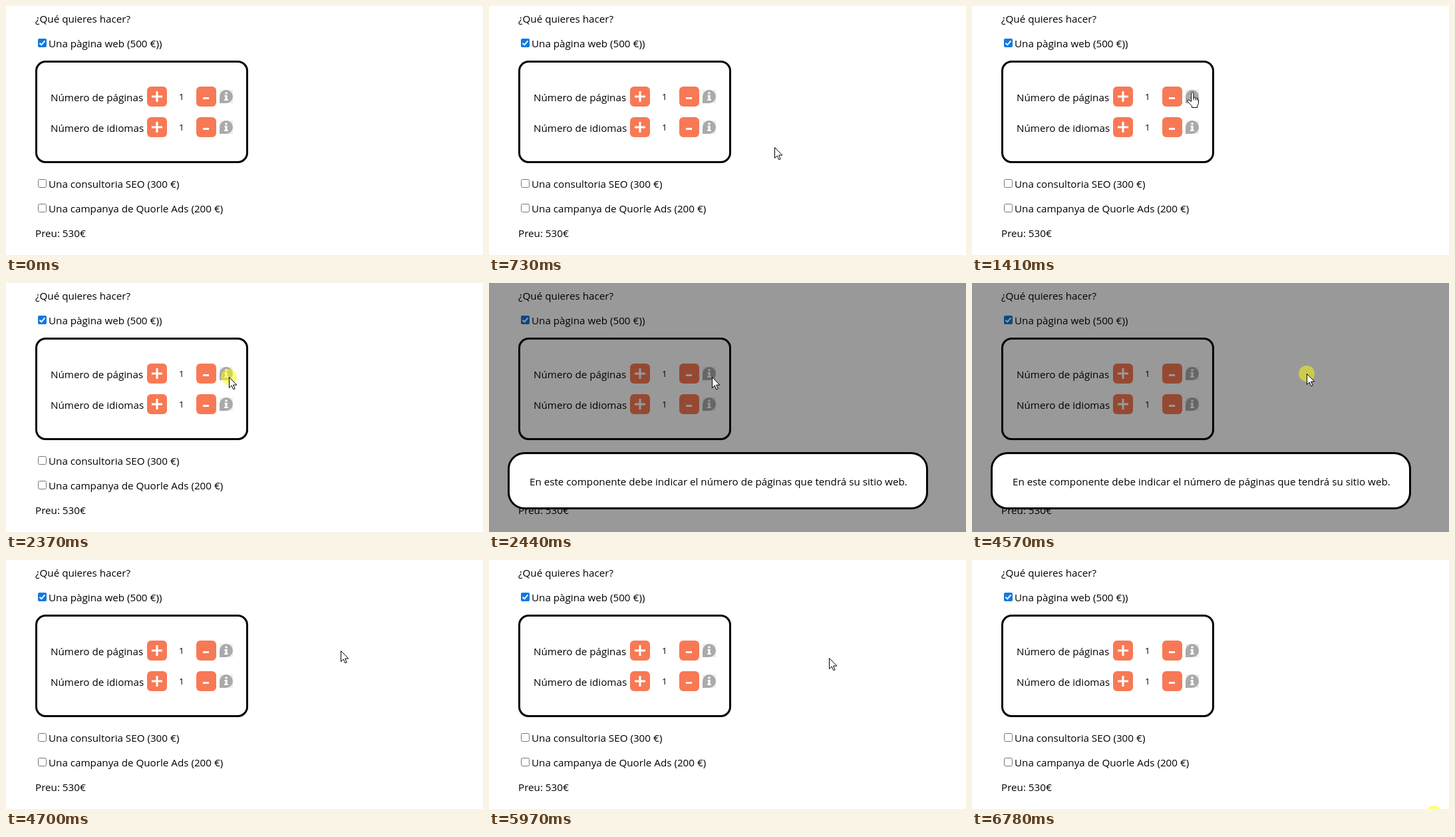
An HTML page with a canvas for the animation above (6850 ms loop, 717 px wide and 374 px high).

```html
<!DOCTYPE html>
<html lang="es">
<head>
<meta charset="utf-8">
<title>Presupuesto</title>
<style>
html, body { margin: 0; width: 100%; height: 100%; overflow: hidden; background: #fff; }
canvas { display: block; }
</style>
</head>
<body>
<canvas id="stage" width="717" height="374"></canvas>
<script>
const LOOP = 6850;
const MODAL_ON = 2440, MODAL_OFF = 4700;
const ctx = document.getElementById('stage').getContext('2d');

const easeOut = u => 1 - (1 - u) ** 2;
const smooth = u => u * u * (3 - 2 * u);
const linear = u => u;

// start time, step length, step count, easing, waypoints of the pointer
const moves = [
  [520, 70, 9, easeOut, [[654, 399], [329, 129]]],
  [1410, 70, 1, linear, [[329, 129], [330, 130]]],
  [1680, 70, 1, linear, [[330, 130], [331, 131]]],
  [1880, 70, 7, smooth, [[331, 131], [335, 141]]],
  [3040, 70, 10, smooth, [[335, 141], [318, 215], [332, 296], [375, 317], [410, 303], [404, 278]]],
  [3740, 72, 6, easeOut, [[404, 278], [440, 210], [503, 136]]],
  [5970, 69, 8, smooth, [[503, 136], [694, 381]]]
];

// press time, release time
const clicks = [[2300, 2440], [4570, 4700], [6780, 6850]];

const arrow = new Path2D('M.5 .5V16.5L4.2 13L6.8 18.8L9.2 17.8L6.6 12.1H11.8Z');
const hand = new Path2D('M6.5 14.5V2.3a1.7 1.7 0 0 1 3.4 0V8.6q1.7-1.3 3 .5q1.5-.9 2.6 .8q1.8-.3 2 1.6V16q0 3-2 5.2V23.5H7.5V21L1.2 14.8q-1.2-2 .6-2.8q1.5-.2 4.7 2.5Z');
const knuckles = new Path2D('M9.9 8.6V12M12.9 9.2V12.5M15.5 10V13');

function along(points, u) {
  const last = points.length - 1;
  const i = Math.min(Math.floor(u * last), last - 1);
  const f = u * last - i;
  const at = n => points[Math.max(0, Math.min(last, n))];
  const [a, b, c, d] = [at(i - 1), at(i), at(i + 1), at(i + 2)];
  return [0, 1].map(k => last === 1
    ? b[k] + (c[k] - b[k]) * f
    : b[k] + f / 2 * (c[k] - a[k]
      + f * (2 * a[k] - 5 * b[k] + 4 * c[k] - d[k]
      + f * (3 * (b[k] - c[k]) + d[k] - a[k]))));
}

function pointer(t) {
  const move = moves.filter(m => m[0] <= t).pop();
  if (!move) return null;
  const [start, step, count, ease, points] = move;
  const k = Math.min(Math.floor((t - start) / step) + 1, count);
  return along(points, ease(k / count)).map(Math.round);
}

function label(s, x, y, size = 15.2) {
  ctx.font = size + 'px "Open Sans", "Noto Sans", sans-serif';
  ctx.fillStyle = '#000';
  ctx.fillText(s, x, y);
}

function box(x, y, w, h, r, fill, stroke, line = 1) {
  ctx.beginPath();
  ctx.roundRect(x, y, w, h, r);
  if (fill) {
    ctx.fillStyle = fill;
    ctx.fill();
  }
  if (stroke) {
    ctx.strokeStyle = stroke;
    ctx.lineWidth = line;
    ctx.stroke();
  }
}

function disc(x, y, r, color) {
  ctx.fillStyle = color;
  ctx.beginPath();
  ctx.arc(x, y, r, 0, Math.PI * 2);
  ctx.fill();
}

function checkbox(y, checked) {
  if (!checked) {
    box(48.5, y + .5, 12, 12, 2, '#fff', '#767676');
    return;
  }
  box(48, y, 13, 13, 2, '#1179df');
  ctx.strokeStyle = '#fff';
  ctx.lineWidth = 2;
  ctx.beginPath();
  ctx.moveTo(50.5, y + 6.7);
  ctx.lineTo(53.3, y + 9.4);
  ctx.lineTo(58.4, y + 3.3);
  ctx.stroke();
}

function infoIcon(x, y) {
  box(x - 10, y - 10, 20, 20, 0, '#f0efed');
  disc(x, y, 10, '#aaa');
  ctx.beginPath();
  ctx.moveTo(x - 10, y);
  ctx.lineTo(x - 10, y + 10);
  ctx.lineTo(x, y + 10);
  ctx.fill();
  disc(x, y - 5, 1.8, '#fff');
  ctx.fillRect(x - 2.5, y - 2, 4, 2);
  ctx.fillRect(x - 1.5, y - 2, 3, 8);
  ctx.fillRect(x - 3, y + 4, 6, 2);
}

function counterRow(name, y) {
  label(name, 67, y + 7);
  box(212, y - 15, 30, 30, 6, '#f87955');
  box(286, y - 15, 30, 30, 6, '#f87955');
  ctx.fillStyle = '#fff';
  ctx.fillRect(219, y - 1.5, 16, 3);
  ctx.fillRect(225.5, y - 8, 3, 16);
  ctx.fillRect(296, y + 1, 9, 3);
  label('1', 260, y + 5, 13.3);
  infoIcon(331, y);
}

function form() {
  label('¿Qué quieres hacer?', 44, 25);
  checkbox(49, true);
  label('Una pàgina web (500 €))', 64, 62);
  box(45.5, 83.5, 317, 151, 14, null, '#000', 3);
  counterRow('Número de páginas', 136);
  counterRow('Número de idiomas', 182);
  checkbox(260, false);
  label('Una consultoria SEO (300 €)', 64, 273);
  checkbox(297, false);
  label('Una campanya de Quorle Ads (200 €)', 64, 310);
  label('Preu: 530€', 44, 347);
}

function modal() {
  ctx.fillStyle = 'rgba(0,0,0,.4)';
  ctx.fillRect(0, 0, 717, 374);
  box(29.5, 255.5, 629, 83, 24, '#fff', '#000', 3);
  label('En este componente debe indicar el número de páginas que tendrá su sitio web.', 61, 304);
}

function drawPointer(t) {
  const p = pointer(t);
  if (!p) return;
  const [x, y] = p;
  if (clicks.some(([a, b]) => t >= a && t < b)) disc(x, y, 12, 'rgba(255,255,0,.5)');
  const overIcon = t < 2370 && x >= 321 && x < 341 && y >= 126 && y < 146;
  ctx.save();
  ctx.translate(overIcon ? x - 7 : x, overIcon ? y - 1 : y);
  ctx.fillStyle = '#fff';
  ctx.strokeStyle = '#000';
  ctx.lineWidth = 1;
  const shape = overIcon ? hand : arrow;
  ctx.fill(shape);
  ctx.stroke(shape);
  if (overIcon) ctx.stroke(knuckles);
  ctx.restore();
}

function draw(now) {
  const t = now % LOOP;
  ctx.fillStyle = '#fff';
  ctx.fillRect(0, 0, 717, 374);
  form();
  if (t >= MODAL_ON && t < MODAL_OFF) modal();
  drawPointer(t);
  requestAnimationFrame(draw);
}

draw(0);
</script>
</body>
</html>
```
